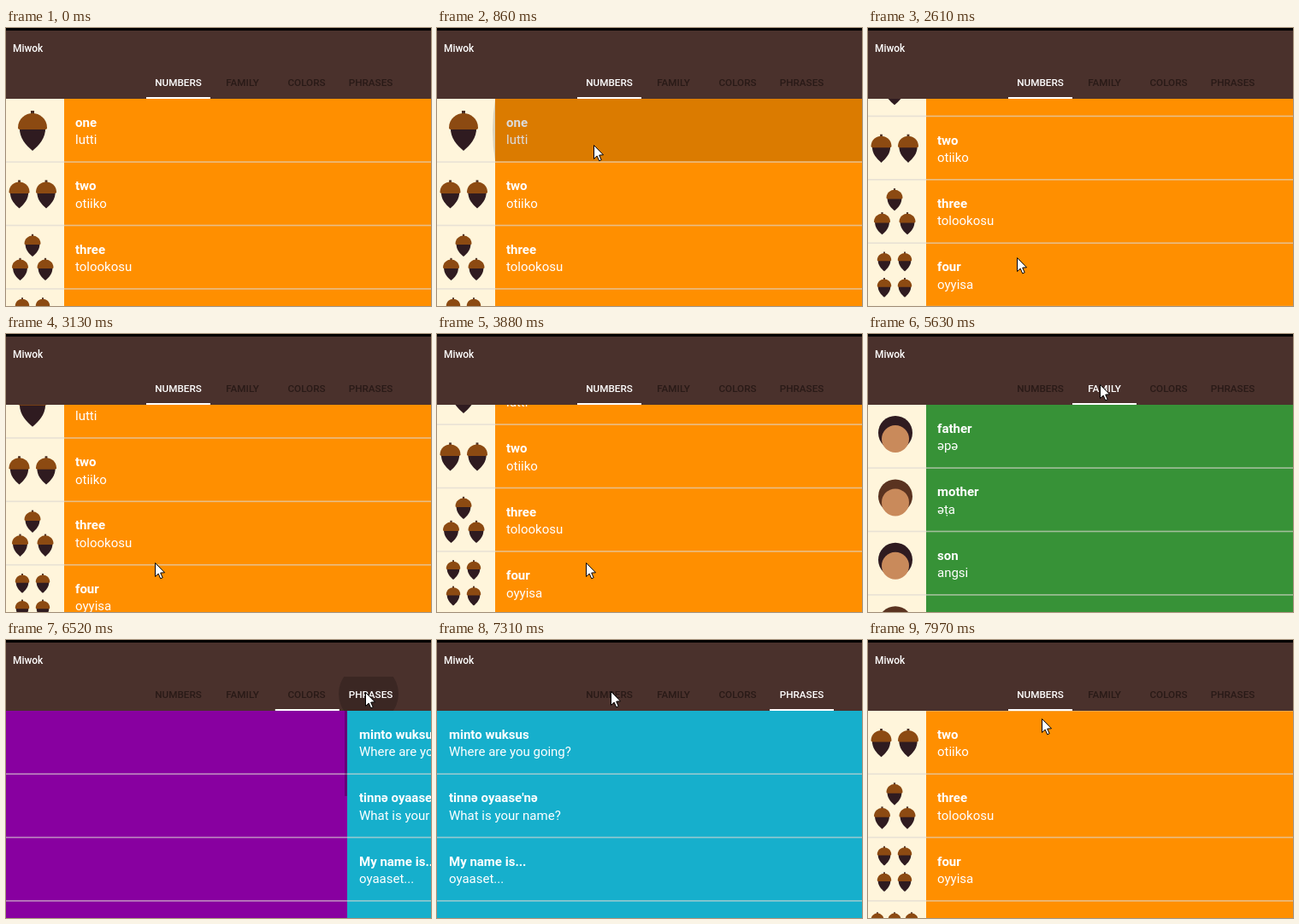
An HTML page with a canvas that plays this animation: 497 px wide and 326 px high, repeating every 8000 ms.

```html
<!DOCTYPE html>
<html lang="en">
<head>
<meta charset="utf-8">
<title>Language tabs</title>
<style>
html, body { margin: 0; width: 100%; height: 100%; overflow: hidden; background: #4a312c; }
canvas { display: block; width: 497px; height: 326px; }
</style>
</head>
<body>
<canvas id="stage"></canvas>
<script>
const W = 497, H = 326, LOOP = 8000;
const TOP = 83, ROW = 74.4, IMAGE = 68;
const TAB_X = 164, TAB_W = 75;
const BAR = '#4a312c', CREAM = '#fff5db';
const FONT = 'Roboto, Arial, sans-serif';

const canvas = document.getElementById('stage');
const ctx = canvas.getContext('2d');
const ratio = window.devicePixelRatio || 1;
canvas.width = W * ratio;
canvas.height = H * ratio;

const linear = p => p;
const easeOut = p => 1 - (1 - p) ** 3;
const settle = p => 1 - (1 - p) ** 5;
const smooth = p => p * p * (3 - 2 * p);

// Keys are [time, value, easing towards this key].
function track(t, keys) {
  if (t <= keys[0][0]) return keys[0][1];
  for (let i = 1; i < keys.length; i++) {
    const [end, to, ease = linear] = keys[i];
    if (t < end) {
      const [start, from] = keys[i - 1];
      return from + (to - from) * ease((t - start) / (end - start));
    }
  }
  return keys[keys.length - 1][1];
}

const scrollKeys = [
  [2150, 0], [2610, 53.5], [2930, ROW, easeOut], [2960, ROW], [3290, 0, smooth],
  [3550, 0], [3880, 51], [4040, 51], [4200, ROW, easeOut]
];
const pageKeys = [
  [5250, 0], [5690, 1, settle], [6220, 1], [6310, 1.5, smooth], [6519, 1.5],
  [6520, 2.19], [6860, 3, easeOut], [7620, 3], [7960, 0, settle]
];
const markKeys = [
  [5250, 0], [5560, 1, smooth], [6220, 1], [6310, 1.35, smooth], [6519, 1.35],
  [6520, 2], [6800, 3, easeOut], [7620, 3], [7940, 0, smooth]
];
const cursorX = [
  [180, 384], [580, 183, easeOut], [1000, 183], [1280, 174, smooth],
  [4200, 174], [4600, 225, smooth], [4840, 263], [4990, 271, easeOut],
  [5950, 271], [6220, 420, smooth], [6840, 420], [7310, 203, smooth]
];
const cursorY = [
  [180, 322], [580, 137, easeOut], [1000, 137], [1280, 185, smooth],
  [1530, 185], [1900, 269, smooth], [4200, 268], [4600, 133, smooth],
  [4840, 61, easeOut], [4990, 59], [5950, 59], [6220, 61],
  [6840, 61], [7310, 60], [7760, 60], [7970, 92, smooth]
];

const tabs = ['NUMBERS', 'FAMILY', 'COLORS', 'PHRASES'];

const pages = [
  { color: '#ff8f00', art: drawAcorns, rows: [
    ['one', 'lutti'], ['two', 'otiiko'], ['three', 'tolookosu'],
    ['four', 'oyyisa'], ['five', 'massokka'], ['six', 'temmokka']] },
  { color: '#379237', art: drawPerson, rows: [
    ['father', 'əpə'], ['mother', 'əṭa'], ['son', 'angsi'], ['daughter', 'tune']] },
  { color: '#8800a0', art: drawSwatch, bar: 100, rows: [
    ['', ''], ['', ''], ['', ''], ['', '']] },
  { color: '#16afcc', rows: [
    ['minto wuksus', 'Where are you going?'],
    ["tinnə oyaase'nə", 'What is your name?'],
    ['My name is...', 'oyaaset...'],
    ['michəksəs?', 'How are you feeling?']] }
];

// Per count: acorn width, then centre x and top y of each.
const acornSets = [
  [34, [31, 14]],
  [24, [15.5, 21], [47, 21]],
  [19, [31, 10], [16.5, 38], [46, 38]],
  [16.5, [19, 10], [43, 10], [19, 40.5], [43, 40.5]],
  [15, [11, 13], [31, 13], [51, 13], [21, 40], [41, 40]],
  [15, [11, 13], [31, 13], [51, 13], [11, 40], [31, 40], [51, 40]]
];

function rect(x, y, w, h, color) {
  ctx.fillStyle = color;
  ctx.fillRect(x, y, w, h);
}

function disc(x, y, r, color) {
  ctx.fillStyle = color;
  ctx.beginPath();
  ctx.arc(x, y, r, 0, 7);
  ctx.fill();
}

function text(s, x, y, size, weight, color = '#fff', align = 'left') {
  ctx.font = `${weight} ${size}px ${FONT}`;
  ctx.textAlign = align;
  ctx.fillStyle = color;
  ctx.fillText(s, x, y);
}

function clipped(x, y, w, h, draw) {
  ctx.save();
  ctx.beginPath();
  ctx.rect(x, y, w, h);
  ctx.clip();
  draw();
  ctx.restore();
}

function acorn(x, y, w) {
  ctx.save();
  ctx.translate(x, y);
  ctx.scale(w / 34, w / 34);
  rect(-2, 0, 4, 5, '#4b3026');
  ctx.fillStyle = '#2f1b20';
  ctx.beginPath();
  ctx.moveTo(-15, 19);
  ctx.bezierCurveTo(-16, 32, -7, 41, 0, 47);
  ctx.bezierCurveTo(7, 41, 16, 32, 15, 19);
  ctx.fill();
  ctx.fillStyle = '#8c4a12';
  ctx.beginPath();
  ctx.moveTo(-17, 20);
  ctx.bezierCurveTo(-17, 9, -8, 3, 0, 3);
  ctx.bezierCurveTo(8, 3, 17, 9, 17, 20);
  ctx.quadraticCurveTo(17, 22, 14, 22);
  ctx.lineTo(-14, 22);
  ctx.quadraticCurveTo(-17, 22, -17, 20);
  ctx.fill();
  ctx.restore();
}

function drawAcorns(i, y) {
  const [w, ...spots] = acornSets[i];
  for (const [x, dy] of spots) acorn(x, y + dy, w);
}

function drawPerson(i, y) {
  disc(32, y + 33, 20, i % 2 ? '#5a3320' : '#2f1b20');
  disc(32, y + 40, 16, '#c98a5b');
}

function drawSwatch(i, y) {
  disc(33, y + 37, 22, ['#c6382c', '#4d8a3a', '#7b4a24', '#8d8d8d'][i]);
}

function drawPage(page, scroll, shade) {
  rect(0, TOP, W, H - TOP, page.color);
  if (page.art) rect(0, TOP, IMAGE, H - TOP, CREAM);
  const left = page.art ? 81 : 14;
  page.rows.forEach(([first, second], i) => {
    const y = TOP + i * ROW - scroll;
    if (y > H || y < TOP - ROW) return;
    if (page.art) page.art(i, y);
    text(first, left, y + 32.8, 15, 700);
    text(second, left, y + 53.3, 15, 400);
    if (i === 0 && shade > 0) {
      clipped(0, y, W, ROW - 1, () => disc(282.5, y + 37, 217.5, `rgba(0,0,0,${shade})`));
    }
    rect(0, y + ROW - 1.1, W, 1.6, 'rgba(220,216,210,.65)');
  });
  if (page.bar) rect(W - 3, TOP, 3, page.bar, 'rgba(0,0,0,.25)');
}

function drawPages(t) {
  const pos = track(t, pageKeys);
  const scroll = track(t, scrollKeys);
  const shade = t < 860 ? 0 : track(t, [[880, .14], [1200, 0]]);
  clipped(0, TOP, W, H - TOP, () => {
    pages.forEach((page, i) => {
      const x = Math.round((i - pos) * W);
      if (Math.abs(x) >= W) return;
      ctx.save();
      ctx.translate(x, 0);
      drawPage(page, i ? 0 : scroll, i ? 0 : shade);
      ctx.restore();
    });
  });
}

function drawHeader(t) {
  rect(0, 0, W, TOP, BAR);
  rect(0, 0, W, 3, '#000');
  text('Miwok', 8, 28, 11.9, 500);
  const press = t < 6220 ? 0 : track(t, [[6220, 0], [6300, .2], [6530, .2], [6800, 0]]);
  if (press > 0) {
    clipped(TAB_X, 43, TAB_W * 4, 40, () => disc(424, 63, 35, `rgba(0,0,0,${press})`));
  }
  const active = t < 5250 || t >= 7640 ? 0 : t < 6230 ? 1 : 3;
  tabs.forEach((name, i) => {
    const x = TAB_X + TAB_W * (i + .5);
    text(name, x, 68.2, 11.7, 500, i === active ? '#fff' : '#291a17', 'center');
  });
  rect(TAB_X + TAB_W * track(t, markKeys), 81, TAB_W, 2, '#fff');
}

function drawCursor(t) {
  if (t < 180) return;
  ctx.save();
  ctx.translate(Math.round(track(t, cursorX)) + .5, Math.round(track(t, cursorY)) + .5);
  ctx.beginPath();
  [[0, 0], [0, 16], [3.7, 12.6], [6.2, 18.3], [8.7, 17.2], [6.2, 11.6], [11, 11.3]]
    .forEach(([x, y]) => ctx.lineTo(x, y));
  ctx.closePath();
  ctx.fillStyle = '#fff';
  ctx.fill();
  ctx.strokeStyle = '#000';
  ctx.lineWidth = 1;
  ctx.stroke();
  ctx.restore();
}

const start = performance.now();

function frame() {
  const t = (performance.now() - start) % LOOP;
  ctx.setTransform(ratio, 0, 0, ratio, 0, 0);
  drawPages(t);
  drawHeader(t);
  drawCursor(t);
  requestAnimationFrame(frame);
}
frame();
</script>
</body>
</html>
```
